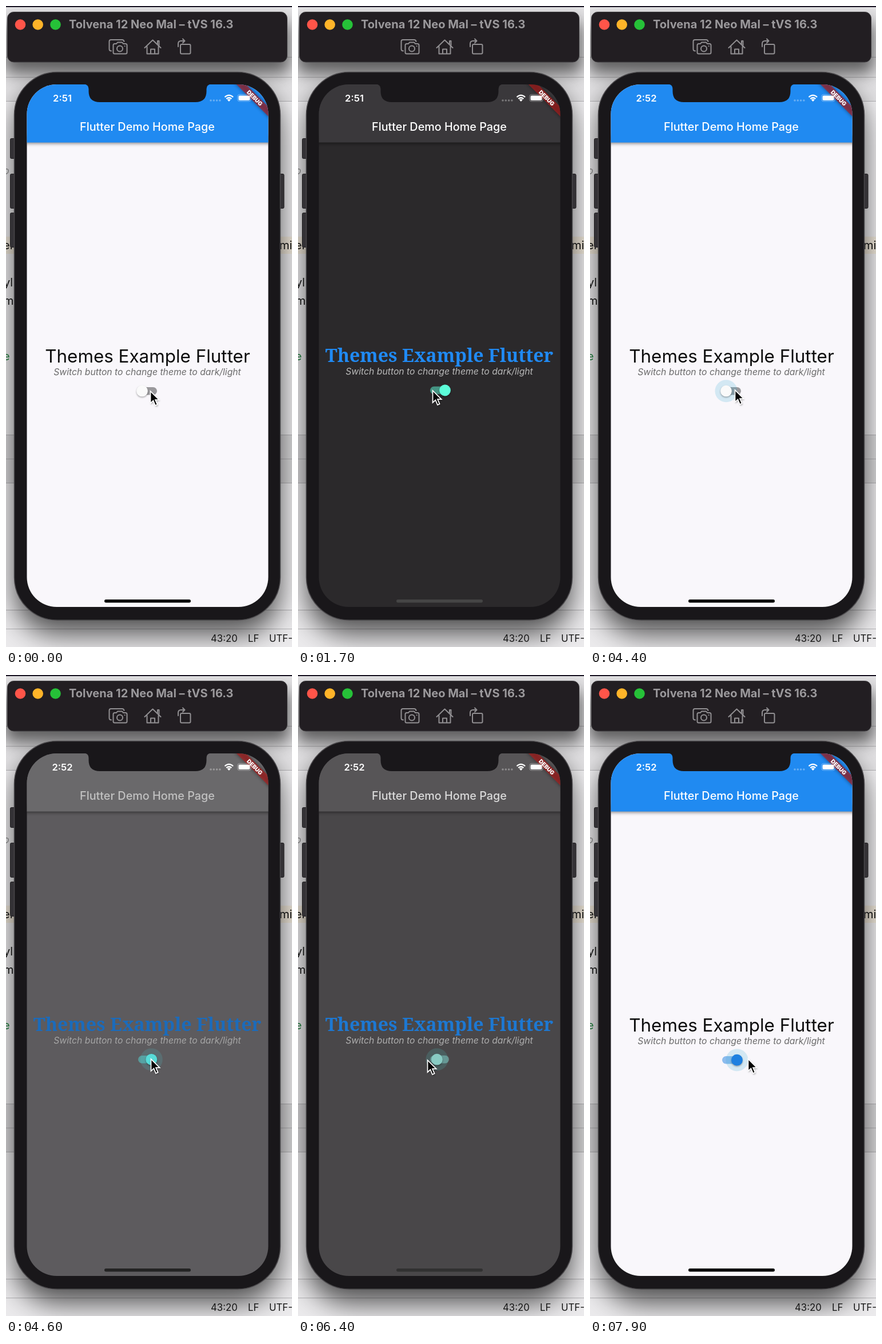
Recreate the animation shown at these times as an HTML page. Size 500 by 1120 pixels, loop 8 s.

```html
<!DOCTYPE html>
<html lang="en">
<head>
<meta charset="utf-8">
<title>Theme switch</title>
<style>
  html, body { margin: 0; width: 100%; height: 100%; overflow: hidden; background: #e4e3e5; }
  svg { display: block; width: 500px; height: 1120px; }
  text { font-family: Inter, "Noto Sans", sans-serif; white-space: pre; }
  .mono { font: 20px "Noto Sans Mono", monospace; fill: #111; }
  .mid { text-anchor: middle; }
  .icon { fill: none; stroke: #918f92; stroke-width: 2; stroke-linejoin: round; stroke-linecap: round; }
</style>
</head>
<body>
<svg viewBox="0 0 500 1120" xmlns="http://www.w3.org/2000/svg">
  <defs>
    <filter id="wide" x="-30%" y="-30%" width="160%" height="160%"><feGaussianBlur stdDeviation="24"/></filter>
    <filter id="bar" x="-30%" y="-100%" width="160%" height="300%"><feGaussianBlur stdDeviation="14"/></filter>
    <filter id="soft" x="-50%" y="-50%" width="200%" height="200%"><feGaussianBlur stdDeviation="1.6"/></filter>
    <filter id="band" x="-20%" y="-100%" width="140%" height="300%"><feGaussianBlur stdDeviation="3"/></filter>
    <clipPath id="screen"><rect x="36.5" y="137" width="422" height="913" rx="52"/></clipPath>
  </defs>

  <!-- editor behind the device -->
  <rect width="500" height="1120" fill="#e2e1e3"/>
  <rect y="166" width="500" height="583" fill="#f1f0f2"/>
  <rect y="749" width="500" height="84" fill="#dddcde"/>
  <rect y="833" width="500" height="222" fill="#f1f0f2"/>
  <rect y="1055" width="500" height="65" fill="#ebeaec"/>
  <rect y="403" width="500" height="30" fill="#f2eadc"/>
  <path d="M0 89.5H500M0 124.5H500M0 166.5H500M0 749.5H500M0 791.5H500M0 833.5H500M0 1055.5H500M0 1088.5H500" stroke="#b5b4b7"/>
  <rect width="500" height="2" fill="#1c1726"/>
  <rect x="14" y="140" width="466" height="958" rx="75" filter="url(#wide)" opacity=".66"/>
  <rect x="-2" y="28" width="498" height="90" rx="9" filter="url(#bar)" opacity=".58"/>
  <g class="mono">
    <text x="-5" y="294" font-style="italic" style="fill:#777;font-size:18px">o</text>
    <text x="-5" y="425">ei</text>
    <text x="478" y="425">mi</text>
    <text x="-4" y="490">yl</text>
    <text x="-4" y="522">mi</text>
    <text x="-5" y="619" style="fill:#1d6a35">e</text>
  </g>
  <g font-size="16.8" fill="#151515">
    <text x="358" y="1111">43:20</text>
    <text x="423" y="1111">LF</text>
    <text x="460" y="1111">UTF-8</text>
  </g>

  <!-- window bar -->
  <rect x="2.5" y="10.5" width="489" height="87.5" rx="11" fill="#221e22" stroke="#3f3d40"/>
  <circle cx="25" cy="32.5" r="9.3" fill="#ff5549"/>
  <circle cx="55.7" cy="32.5" r="9.3" fill="#ffb429"/>
  <circle cx="86.5" cy="32.5" r="9.3" fill="#26c138"/>
  <text x="110" y="38.5" font-size="20" font-weight="700" fill="#9b999c">Tolvena 12 Neo Mal – tVS 16.3</text>
  <g class="icon">
    <path d="M184 78.5Q180.5 78.5 180.5 75V62Q180.5 59 183.5 59H203Q206 59 206.5 62"/>
    <path d="M190 66H193L195 63.5H203L205 66H209Q211.5 66 211.5 68.5V81Q211.5 83.5 209 83.5H190Q187.5 83.5 187.5 81V68.5Q187.5 66 190 66Z"/>
    <circle cx="199" cy="74.5" r="5"/><path d="M207.5 70h.1"/>
    <path d="M242.5 73 256.5 59.5 270.5 73M246.5 71V83.5H266.5V71M253 83V75.5H260V83M265 66V61H267.5V69"/>
    <rect x="305" y="67" width="17.5" height="16.5" rx="2"/>
    <path d="M301 71V66Q301 61 306 61H312M309 57.5 312.5 61 309 64.5"/>
  </g>

  <!-- device -->
  <g fill="#343236" stroke="#201e21">
    <rect x="7.5" y="231.5" width="10" height="35" rx="2"/>
    <rect x="7.5" y="293.5" width="10" height="60" rx="2"/>
    <rect x="7.5" y="361.5" width="10" height="60" rx="2"/>
    <rect x="476" y="293.5" width="10" height="60" rx="2"/>
  </g>
  <rect x="14.5" y="115.5" width="465" height="957.5" rx="75" fill="#19171a" stroke="#4a484b" stroke-width="1.5"/>
  <g clip-path="url(#screen)">
    <rect id="page" x="36" y="137" width="423" height="914"/>
    <rect x="30" y="226" width="436" height="14" filter="url(#band)" opacity=".5"/>
    <rect id="appbar" x="36" y="137" width="423" height="101.5"/>
    <text id="title" class="mid" x="247" y="218" font-size="19.8" font-weight="500">Flutter Demo Home Page</text>
    <text id="plain" class="mid" x="247.5" y="622.5" font-size="31.4">Themes Example Flutter</text>
    <text id="serif" class="mid" x="247" y="622" font-size="32" font-weight="700" style="font-family:'Noto Serif',serif">Themes Example Flutter</text>
    <text id="sub" class="mid" x="247" font-size="15.75" font-style="italic">Switch button to change theme to dark/light</text>
    <g id="toggle">
      <rect id="track" x="231" y="-6.8" width="33" height="13.6" rx="6.8"/>
      <circle id="ripple"/>
      <circle id="shade" cy="1.6" r="9.8" opacity=".35" filter="url(#soft)"/>
      <circle id="thumb" r="9.9"/>
    </g>
    <rect id="home" x="172" y="1037" width="151" height="5.5" rx="2.75"/>
    <g transform="translate(458.5 137) rotate(45) scale(.984)">
      <rect x="-60" y="28" width="120" height="12" filter="url(#band)" opacity=".45"/>
      <rect x="-60" y="28" width="120" height="12" fill="#b71c1c" opacity=".63"/>
      <text class="mid" y="37.7" font-size="10" font-weight="900" fill="#fff">DEBUG</text>
    </g>
  </g>
  <path d="M136 136.5Q144.5 137 144.5 145V149Q144.5 168 164 168H331Q350.5 168 350.5 149V145Q350.5 137 359 136.5Z" fill="#19171a"/>
  <text id="clock" class="mid" x="98.5" y="167" font-size="16.6" font-weight="600" fill="#fff"></text>
  <g fill="#fff">
    <g opacity=".32">
      <circle cx="358" cy="165" r="1.8"/><circle cx="363.3" cy="165" r="1.8"/>
      <circle cx="368.6" cy="165" r="1.8"/><circle cx="373.9" cy="165" r="1.8"/>
    </g>
    <path d="M389.8 167 386.8 163.7Q389.8 161.2 392.8 163.7Z"/>
    <path d="M382.5 159.3Q389.8 152.5 397.1 159.3M385.2 162.3Q389.8 158.2 394.4 162.3" fill="none" stroke="#fff" stroke-width="2.2"/>
    <rect x="406.5" y="156.5" width="20" height="8.5" rx="2"/>
    <rect x="404.8" y="154.7" width="23.5" height="12" rx="3.5" fill="none" stroke="#fff" opacity=".4"/>
  </g>

  <g id="cursor">
    <path d="M0 0V22.5L5.2 17.7 8.9 26.3 13 24.5 9.3 16.2H16.2Z" transform="translate(1 2)" filter="url(#soft)" opacity=".35"/>
    <path d="M.5 1V22L5.4 17.5 9 26 12.6 24.4 9 16.1H15.7Z" fill="#050505" stroke="#fff" stroke-width="1.7"/>
  </g>
</svg>
<script>
const LOOP = 8000;
const el = {};
document.querySelectorAll('svg [id]').forEach(n => el[n.id] = n);
const set = (id, attrs) => { for (const k in attrs) el[id].setAttribute(k, attrs[k]); };

const linear = u => u;
const smooth = u => u * u * (3 - 2 * u);

// value at time t from [time, value] points
function key(t, pts, ease = linear, col = 1) {
  let a = pts[0];
  for (const b of pts) {
    if (t < b[0]) return a[col] + (b[col] - a[col]) * ease((t - a[0]) / (b[0] - a[0]));
    a = b;
  }
  return a[col];
}

const mix = (a, b, u) => a.map((v, i) => v + (b[i] - v) * u);
const rgb = c => `rgb(${c.map(Math.round)})`;
const grey = v => [v, v, v];

const DARK = [[0, 0], [140, 0], [340, 1], [1980, 1], [2180, 0], [4450, 0], [4650, 1], [6372, 1], [6572, 0]];
const SLIDE = [[0, 0], [120, 0], [320, 1], [1960, 1], [2160, 0], [4430, 0], [4630, 1],
  [6200, 1], [6400, .26], [6480, 0], [7450, 0], [7750, 1]];
const RIPPLE = [[0, 0], [50, 0], [150, 1], [220, 1], [390, 0], [1880, 0], [1980, 1], [2100, 1], [2280, 0],
  [4250, 0], [4370, 1], [4650, 1], [4850, 0], [5370, 0], [5490, 1], [6400, 1], [6600, 0], [7250, 0], [7370, 1]];
const CURSOR = [[0, 252, 672], [1100, 252, 672], [1700, 235, 671], [2900, 235, 671], [3500, 253, 670],
  [4900, 253, 670], [5300, 249, 669.5], [5900, 249, 669.5], [6350, 226, 672], [6700, 226, 672],
  [7200, 254, 671], [7450, 254, 671], [7800, 276, 670]];

function draw(t) {
  const d = key(t, DARK), s = key(t, SLIDE), r = key(t, RIPPLE, smooth);
  const night = d >= .5;
  const page = mix([249, 247, 251], [43, 41, 43], d);
  const bar = night ? mix(grey(255), [58, 56, 59], d) : mix([32, 138, 241], grey(33), d);
  const head = mix(grey(12), [32, 138, 244], d);
  const off = mix(grey(250), grey(165), d);
  const on = mix([30, 128, 224], [92, 253, 217], d);
  const x = 238 + 19 * s, tint = s ** .6;

  set('page', { fill: rgb(page) });
  set('appbar', { fill: rgb(bar) });
  set('title', { fill: rgb(grey(night ? 255 * d : 255)) });
  set('plain', { fill: rgb(head), display: night ? 'none' : 'inline' });
  set('serif', { fill: rgb(head), display: night ? 'inline' : 'none' });
  set('sub', { fill: rgb(mix(grey(107), grey(184), d)), y: 645 - d });
  set('toggle', { transform: `translate(0 ${672.7 - 1.2 * d})` });
  const trackOff = mix(page, mix(grey(0), grey(255), d), .38);
  set('track', { fill: rgb(mix(trackOff, mix(page, on, .5), tint)) });
  set('ripple', { cx: x, r: 19.5 * r, fill: rgb(mix([60, 170, 210], on, d)), opacity: .2 - .06 * d });
  set('shade', { cx: x });
  set('thumb', { cx: x, fill: rgb(mix(off, on, tint)) });
  set('home', { fill: rgb(mix(grey(0), grey(69), Math.max(0, 2 * d - 1))) });
  set('cursor', { transform: `translate(${key(t, CURSOR, smooth)} ${key(t, CURSOR, smooth, 2)})` });
  el.clock.textContent = t < 3300 ? '2:51' : '2:52';
}

const start = performance.now();
function tick() {
  draw((performance.now() - start) % LOOP);
  requestAnimationFrame(tick);
}
tick();
</script>
</body>
</html>
```
